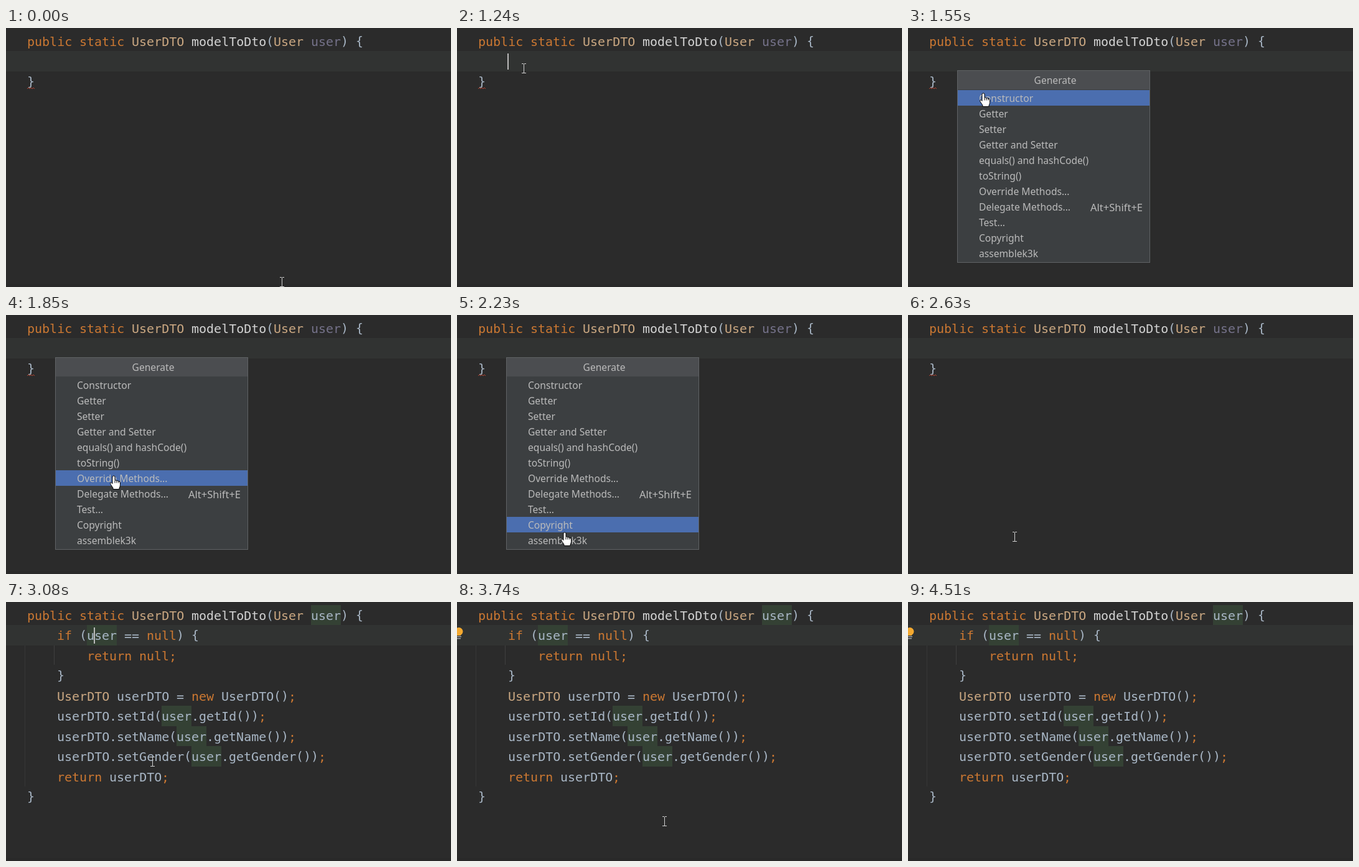
These frames come from a looping animation (715 px wide and 417 px high, 4590 ms). An HTML page with a canvas:

```html
<!DOCTYPE html>
<html lang="en">
<head>
<meta charset="utf-8">
<style>
  html, body { margin: 0; width: 100%; height: 100%; overflow: hidden; background: #2b2b2b; }
  canvas { display: block; }
</style>
</head>
<body>
<canvas id="stage" width="715" height="417"></canvas>
<script>
const ctx = document.getElementById('stage').getContext('2d');
const LOOP = 4590, TICK = 77, CHAR = 12, LINE = 32.5, LEFT = 34;
const CODE_FONT = '20px "DejaVu Sans Mono", monospace';
const MENU_FONT = '15.6px "Noto Sans", sans-serif';
const PLAIN = '#a9b7c6', KEYWORD = '#cc7832', TYPE = '#cba882';

const HEAD = 'public static UserDTO modelToDto(User user) {';
const BODY = [
  '    if (user == null) {',
  '        return null;',
  '    }',
  '    UserDTO userDTO = new UserDTO();',
  '    userDTO.setId(user.getId());',
  '    userDTO.setName(user.getName());',
  '    userDTO.setGender(user.getGender());',
  '    return userDTO;',
  '}'
];
const ITEMS = ['Constructor', 'Getter', 'Setter', 'Getter and Setter',
  'equals() and hashCode()', 'toString()', 'Override Methods...',
  'Delegate Methods...', 'Test...', 'Copyright', 'assemblek3k'];

// Pointer path: time, x, y
const PATH = [
  [0, 443, 409], [150, 370, 300], [301, 190, 60], [378, 110, 8], [455, 71, 35],
  [532, 104, 71], [686, 102, 68], [763, 104, 69], [1070, 104, 69], [1148, 116, 72],
  [1225, 107, 65], [1456, 107, 65], [1841, 172, 258], [1918, 172, 283],
  [2226, 172, 349], [2457, 172, 357], [2534, 171, 357], [2611, 171, 357],
  [3073, 235, 257], [3276, 235, 257], [3690, 333, 353], [3880, 370, 409]
];
const HAND = new Path2D('M-2 1.5Q0-1 2 1.5V8Q4 6.5 5 8.5Q7 7.5 8 9.5Q10 9 10.5 11V15Q10.5 18 9 20V22H-1V20L-5 14Q-6 11-4 11L-2 13Z');

const between = (t, a, b) => t >= a && t < b;
const rowTop = row => Math.floor(5 + LINE * row);

function rect(color, x, y, w, h) {
  ctx.fillStyle = color;
  ctx.fillRect(x, y, w, h);
}

function text(str, x, y, color) {
  ctx.fillStyle = color;
  ctx.fillText(str, x, y);
}

function pointerAt(t) {
  const q = Math.max(0, 70 + Math.floor((t - 70) / TICK) * TICK);
  const i = PATH.findIndex(p => p[0] > q);
  if (i < 0) return PATH[PATH.length - 1].slice(1);
  const [t0, x0, y0] = PATH[i - 1], [t1, x1, y1] = PATH[i];
  const k = (q - t0) / (t1 - t0);
  return [Math.round(x0 + (x1 - x0) * k), Math.round(y0 + (y1 - y0) * k)];
}

function codeLine(str, row, typeColor, paramColor) {
  const baseline = rowTop(row) + 24;
  let previous = '';
  for (const { 0: word, index } of str.matchAll(/\w+|[^\w\s]/g)) {
    let color = PLAIN;
    if (/^(public|static|if|return|null|new|;)$/.test(word)) color = KEYWORD;
    else if (/^User(DTO)?$/.test(word) && previous !== 'new') color = typeColor;
    else if (word === 'modelToDto') color = '#d3d3d3';
    else if (word === 'user' && row === 0) color = paramColor;
    // Brackets sit slightly above the other glyphs
    const lift = /[(){}]/.test(word) ? 1 : 0;
    text(word, LEFT + index * CHAR, baseline - lift, color);
    previous = word;
  }
}

function squiggle(row) {
  const y = rowTop(row) + 27;
  ctx.beginPath();
  for (let i = 0; i <= 6; i++) ctx.lineTo(34 + i * 2, y + (i % 2 ? -1 : 1));
  ctx.strokeStyle = '#b04331';
  ctx.lineWidth = 1;
  ctx.stroke();
}

function editor(t) {
  const filled = t >= 2700, marked = t >= 2780, resolved = !filled || t >= 3080;
  rect('#2b2b2b', 0, 0, 715, 417);
  rect('#292929', 0, 412, 715, 5);
  rect('#313332', 0, 37, 715, 33);
  const lines = [HEAD, ...(filled ? BODY : ['', '}'])];
  if (filled) {
    rect('#373737', 30, 70, 1, 227);
    rect('#404040', 77, 70, 1, 31);
  }
  if (marked) lines.forEach((line, row) => {
    for (const { index } of line.matchAll(/\buser\b/g))
      rect('#344134', LEFT + index * CHAR, rowTop(row), 48, rowTop(row + 1) - rowTop(row));
  });
  ctx.font = CODE_FONT;
  ctx.textAlign = 'left';
  lines.forEach((line, row) =>
    codeLine(line, row, resolved ? TYPE : PLAIN, marked ? PLAIN : '#75728a'));
  if (t < 3080) squiggle(lines.length - 1);

  if (between(t, 310, 550) || between(t, 1170, 1470)) rect('#bbbbbb', 81, 41, 2, 26);
  if (between(t, 2700, 3280) || between(t, 3510, 3740) || between(t, 4280, 4510))
    rect('#bbbbbb', 141, 41, 2, 26);
  if (t >= 3430) bulb();
}

function bulb() {
  ctx.fillStyle = '#f4a930';
  ctx.beginPath();
  ctx.arc(3, 47.5, 6.5, 0, 7);
  ctx.fill();
  rect('#f4a930', 0, 51, 6, 3);
  rect('#9da0a2', 0, 55, 7, 1.5);
  rect('#9da0a2', 0, 58, 6, 1.5);
}

function menu(pointerY) {
  const selected = Math.max(0, Math.floor((pointerY - 100) / 25));
  rect('#606365', 79, 68, 310, 310);
  rect('#3c3f41', 80, 69, 308, 308);
  rect('#4b4d50', 80, 69, 308, 30);
  rect('#4b6eaf', 80, 100 + selected * 25, 308, 25);
  ctx.font = MENU_FONT;
  ITEMS.forEach((item, i) => text(item, 114, 119 + i * 25, '#bbbbbb'));
  ctx.textAlign = 'center';
  text('Generate', 236.5, 90, '#bbbbbb');
  ctx.textAlign = 'right';
  ctx.font = MENU_FONT.replace('15.6', '16.5');
  text('Alt+Shift+E', 377, 295, '#bbbbbb');
}

function ibeam(x, y) {
  const c = '#d0d0d0';
  rect(c, x, y - 7, 1, 15);
  for (const dy of [-8, 7]) {
    rect(c, x - 3, y + dy, 3, 1);
    rect(c, x + 1, y + dy, 3, 1);
  }
}

function hand(x, y) {
  ctx.save();
  ctx.translate(x + 1, y + 0.5);
  ctx.fillStyle = '#fff';
  ctx.strokeStyle = '#000';
  ctx.lineWidth = 1;
  ctx.fill(HAND);
  ctx.stroke(HAND);
  ctx.beginPath();
  for (const fx of [2, 5, 8]) {
    ctx.moveTo(fx, 8.5);
    ctx.lineTo(fx, 12);
  }
  ctx.stroke();
  ctx.restore();
}

function draw(now) {
  const t = now % LOOP, [x, y] = pointerAt(t), open = between(t, 1470, 2550);
  editor(t);
  if (open) menu(y);
  if (t < 3960) (open && y > 68 ? hand : ibeam)(x, y);
}

const start = performance.now();
function tick() {
  draw(performance.now() - start);
  requestAnimationFrame(tick);
}
tick();
</script>
</body>
</html>
```
